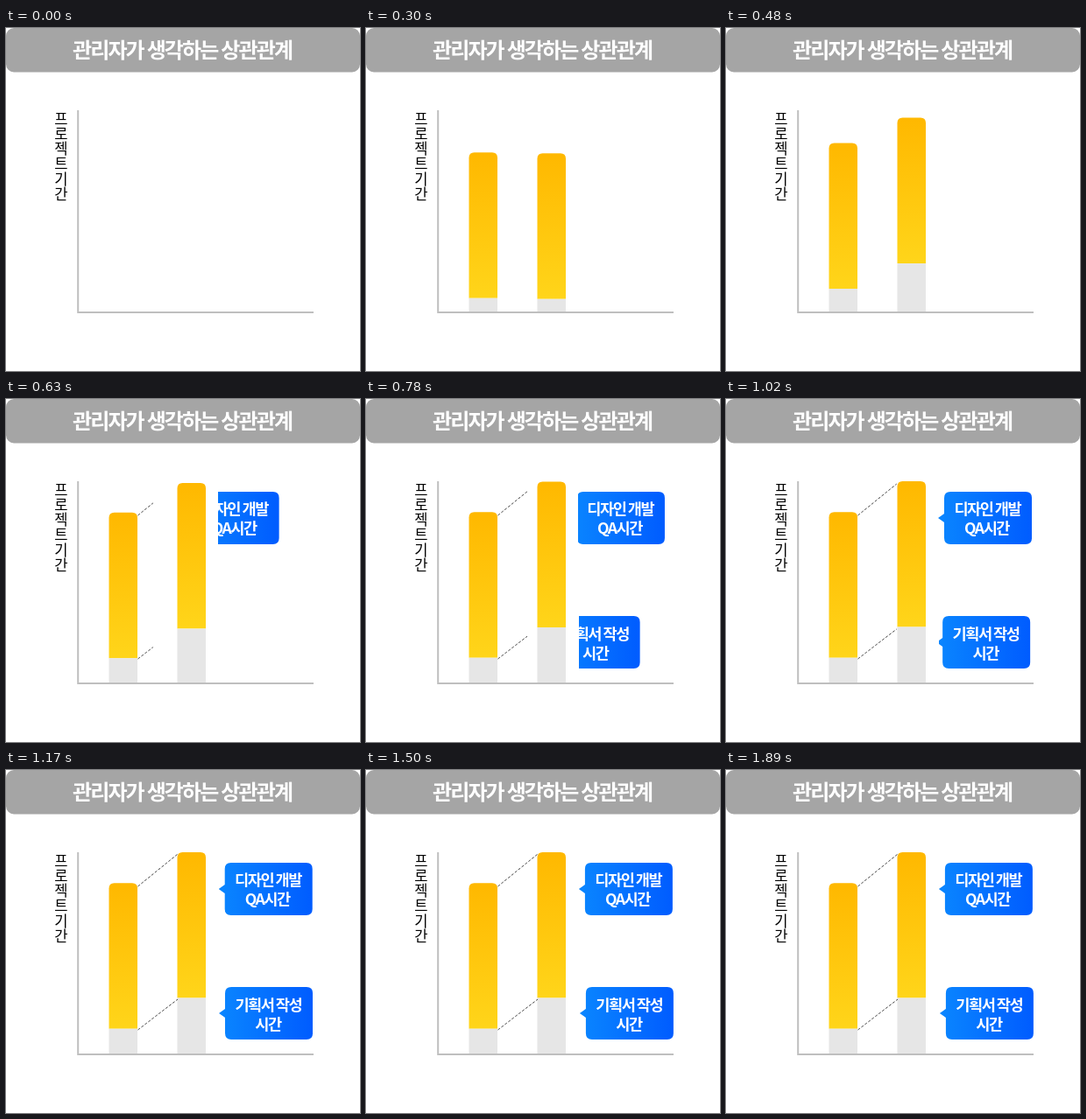
Recreate the animation shown at these times as an HTML page. Size 404 by 392 pixels, loop 2.7 s.

```html
<!DOCTYPE html>
<html lang="ko">
<head>
<meta charset="utf-8">
<style>
  html, body { margin: 0; width: 100%; height: 100%; overflow: hidden; background: #fff; }
  svg { display: block; width: 404px; height: 392px; }
  text { font-family: "Noto Sans CJK KR", "Noto Sans CJK", sans-serif; text-anchor: middle; }
  .white { fill: #fff; font-weight: 700; word-spacing: -1px; }
  .title { font-size: 24px; letter-spacing: -1.87px; }
  .label { font-size: 17.6px; letter-spacing: -1.5px; }
  .axis { fill: none; stroke: #bfbfbf; stroke-width: 2; }
  .dash { stroke: #444; stroke-dasharray: 3 2; }
</style>
</head>
<body>
<svg viewBox="0 0 404 392">
  <defs>
    <linearGradient id="gold" x2="0" y2="1">
      <stop stop-color="#ffb800"/><stop offset="1" stop-color="#ffd51a"/>
    </linearGradient>
    <linearGradient id="blue">
      <stop stop-color="#0a86ff"/><stop offset="1" stop-color="#005cff"/>
    </linearGradient>
    <clipPath id="plot"><rect x="82" y="60" width="270" height="264"/></clipPath>
    <clipPath id="side"><path d="M242 90H404V330H243V200H242z"/></clipPath>
    <clipPath id="wipe"><rect id="reveal" x="150" y="90" width="0" height="220"/></clipPath>
    <path id="bar" d="M0 166.5V6q0-6 6-6h20.5q6 0 6 6v160.5z" fill="url(#gold)"/>
    <path id="bubble" fill="url(#blue)"
      d="M14 0h86q7 0 7 7v46q0 7-7 7h-86q-7 0-7-7v-18l-7-5 7-5v-18q0-7 7-7z"/>
  </defs>

  <rect width="404" height="50.5" rx="9" fill="#a5a5a5"/>
  <text class="white title" x="201.1" y="34.3">관리자가 생각하는 상관관계</text>
  <g id="vertical" font-size="16.6" font-weight="500"></g>

  <g clip-path="url(#plot)">
    <g id="bar1"><use href="#bar"/><rect y="166.5" width="32.5" height="40" fill="#e6e6e6"/></g>
    <g id="bar2"><use href="#bar"/><rect y="166.5" width="32.5" height="80" fill="#e6e6e6"/></g>
  </g>
  <path class="axis" d="M82.2 94V325H351"/>
  <g clip-path="url(#wipe)">
    <path class="dash" d="M150.5 133L196 96M150.5 297L196 262"/>
  </g>

  <g clip-path="url(#side)">
    <g id="bubble1">
      <use href="#bubble"/>
      <text class="white label" x="56.3" y="26">디자인 개발</text>
      <text class="white label" x="55.5" y="48">QA시간</text>
    </g>
    <g id="bubble2">
      <use href="#bubble"/>
      <text class="white label" x="56.3" y="26.5">기획서 작성</text>
      <text class="white label" x="56" y="48.5">시간</text>
    </g>
  </g>
</svg>
<script>
  const LOOP = 2700, STEP = 30, DURATION = 715;
  const $ = id => document.getElementById(id);
  const progress = (t, start) => Math.min(1, Math.max(0, (t - start) / DURATION));
  const expoOut = p => p === 1 ? 1 : 1 - 2 ** (-10 * p);
  const cubicOut = p => 1 - (1 - p) ** 3;
  const place = (id, x, y) => $(id).setAttribute("transform", `translate(${x} ${y})`);

  $("vertical").innerHTML = [..."프로젝트기간"]
    .map((c, i) => `<text x="62.8" y="${109.8 + i * 17.2}">${c}</text>`).join("");

  function draw(time) {
    const t = Math.floor(time % LOOP / STEP) * STEP;
    const rise = (id, x, height, start) =>
      place(id, x, 324 - height * expoOut(progress(t, start)));
    const slide = (id, x, y, start) =>
      place(id, x - 109 * (1 - expoOut(progress(t, start))), y);

    rise("bar1", 117.5, 194.8, 21);
    rise("bar2", 195.5, 230, 141);
    $("reveal").setAttribute("width", 46 * cubicOut(progress(t, 522)));
    slide("bubble1", 242.9, 106, 522);
    slide("bubble2", 243.9, 248, 672);
  }

  const begin = performance.now();
  function loop() {
    draw(performance.now() - begin);
    requestAnimationFrame(loop);
  }
  loop();
</script>
</body>
</html>
```
